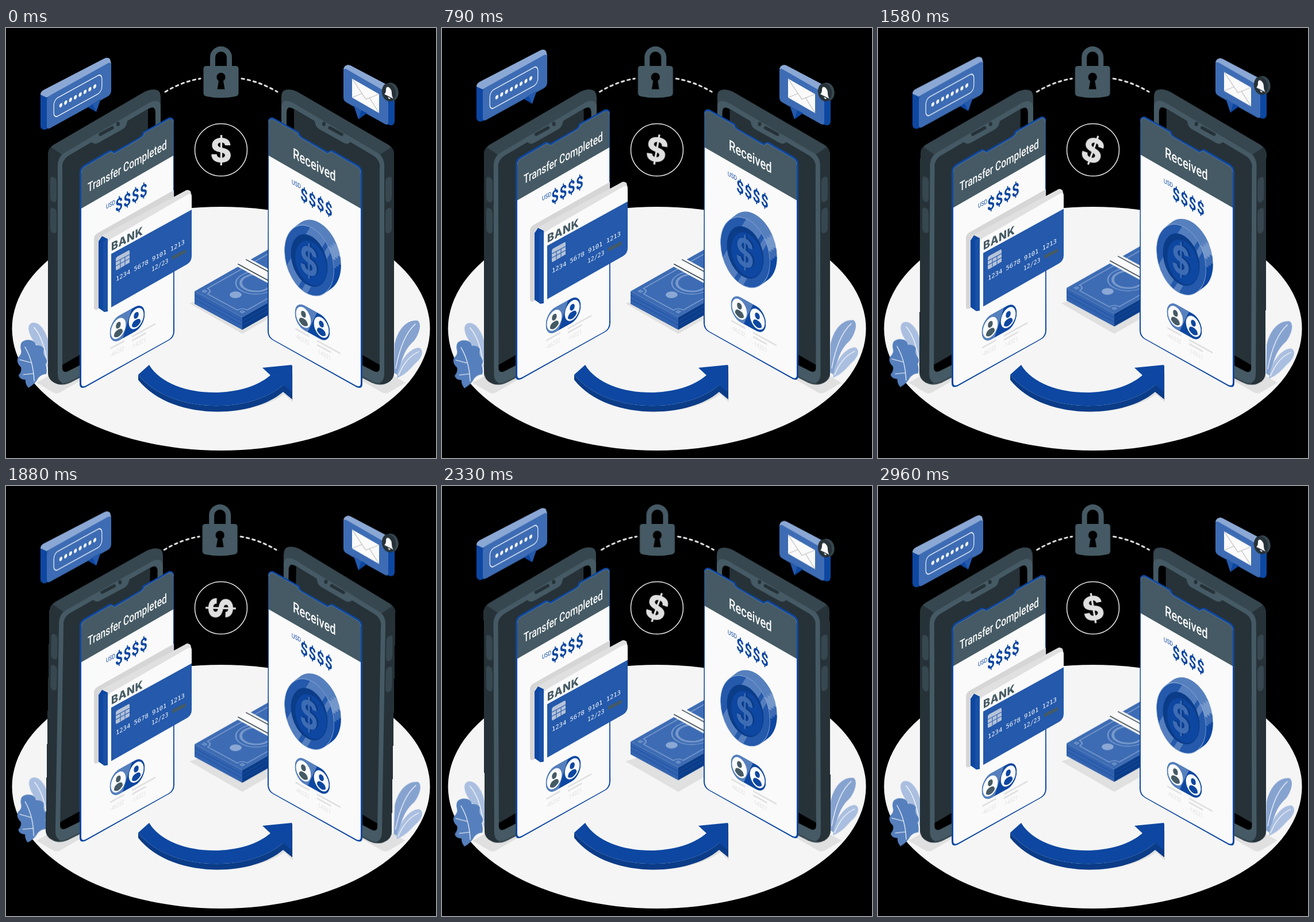
These frames come from a looping animation (748x748 px, 3 s). An HTML page:

```html
<!DOCTYPE html>
<html lang="en">
<head>
<meta charset="utf-8">
<title>Mobile transfer</title>
<style>
html, body { margin: 0; width: 100%; height: 100%; overflow: hidden; background: #000; }
svg { display: block; width: 100vw; height: 100vh; font-family: Roboto, Inter, sans-serif; }
.float { animation: float 1.5s linear infinite; }
.late { animation: late 3s linear infinite; }
.slow { animation: slow 3s linear infinite; }
.shake { animation: shake 1.5s linear infinite; }
.spin { animation: spin 1.5s linear infinite; transform-origin: 374px 212px; }
.wind { animation: wind 1.5s linear infinite; }
@keyframes float { 50% { transform: translateY(-15px); } }
@keyframes late {
  0%, 33.333%, 83.333% { transform: translateY(0); }
  58.333% { transform: translateY(-15px); }
  100% { transform: translateY(-10px); }
}
@keyframes slow {
  0%, 33.333% { transform: translateY(0); }
  83.333% { transform: translateY(-15px); }
  100% { transform: translateY(-10px); }
}
@keyframes shake {
  10%, 90% { transform: translateX(-1.5px); }
  20%, 80% { transform: translateX(3px); }
  30%, 50%, 70% { transform: translateX(-6px); }
  40%, 60% { transform: translateX(6px); }
}
@keyframes spin { to { transform: rotate(360deg); } }
@keyframes wind {
  25% { transform: rotate(1deg); }
  75% { transform: rotate(-1deg); }
}
.navy { fill: #0d47a1; }
.deep { fill: #0b3c88; }
.card { fill: #2459ab; }
.mid { fill: #3d6cb4; }
.soft { fill: #5680bd; }
.pale { fill: #8ba8d5; }
.mist { fill: #aabfe0; }
.slate { fill: #455a64; }
.steel { fill: #37474f; }
.ink { fill: #263238; }
.white { fill: #fafafa; }
.grey { fill: #e0e0e0; }
.line { fill: none; stroke: #fafafa; stroke-width: 1.5; stroke-linecap: round; stroke-linejoin: round; }
.vein { fill: none; stroke: #fafafa; stroke-width: 1.2; stroke-linecap: round; }
.title { font-weight: 500; fill: #fafafa; }
.sum { font-weight: 700; font-size: 30px; letter-spacing: 1.6px; fill: #0d47a1; }
.usd { font-size: 11px; fill: #0d47a1; }
.digits { font: 10.5px "DejaVu Sans Mono", monospace; fill: #fafafa; }
</style>
</head>
<body>
<svg viewBox="0 0 748 748">
<defs>
  <g id="phone">
    <path class="steel" d="M73 221Q73 209 83 203L241 111Q256 104 265 109Q269 112 269 122V522Q269 536 258 542L112 617Q96 624 84 617Q73 611 73 599Z"/>
    <path class="ink" d="M73 221Q73 212 78 207L97 220L97 619Q90 620 84 617Q73 611 73 599Z"/>
    <path class="slate" d="M90 240Q90 224 102 217L249 130Q267 121 269 136V522Q269 532 260 537L112 614Q91 624 90 602Z"/>
    <path d="M98 243Q98 230 108 223L247 141Q260 133 260 148V520L110 596Q99 602 98 592Z"/>
    <path class="ink" d="M98 243Q98 230 108 223L247 141V500L98 586Z"/>
    <path class="slate" d="M147 197L151 200Q155 203 162 199L203 176Q209 172 210 166L212 159Z"/>
    <path d="M164 185L185 173.500" stroke="#263238" stroke-width="5.500" stroke-linecap="round"/>
    <ellipse class="ink" cx="195" cy="167" rx="3" ry="3.800"/>
    <g class="steel">
      <path d="M77 264q0-6 5-5q6 2 6 10v28q0 7-5 6q-6-2-6-9z"/>
      <path d="M77 318q0-6 5-5q6 2 6 10v28q0 7-5 6q-6-2-6-9z"/>
    </g>
  </g>
  <g id="screen">
    <path class="navy" d="M128 252Q128 243 136 238L181 212L188 215L232 190Q237 187 238 181L281 157Q288 153 292 160L293 527Q293 538 284 543L138 625Q128 629 128 619Z"/>
    <path class="white" d="M131 253Q131 245 138 241L181 216Q184 214 188 219L234 192Q240 188 241 183L282 160Q291 156 291 166V527Q291 537 283 542L139 622Q131 626 131 618Z"/>
    <path class="slate" d="M131 314V253Q131 245 138 241L181 216Q184 214 188 219L234 192Q240 188 241 183L282 160Q291 156 291 166V222Z"/>
  </g>
  <clipPath id="pill"><rect x="-40" y="-21.500" width="80" height="43" rx="21.500"/></clipPath>
  <g id="head"><circle cy="-5.500" r="5.500"/><path d="M-10 10Q-10 2 0 2T10 10Q5 14.500 0 14.500T-10 10Z"/></g>
  <g id="users">
    <g clip-path="url(#pill)">
      <path class="navy" d="M-40-22H40V22H-40Z"/>
      <path class="soft" d="M-40-22H11L-11 22H-40Z"/>
    </g>
    <circle class="white" cx="-20.500" r="17"/>
    <circle class="white" cx="20.500" r="17"/>
    <use href="#head" class="slate" x="-20.500"/>
    <use href="#head" class="navy" x="20.500"/>
    <g class="grey">
      <path d="M-39 26h32v3h-32zM10.500 26h54v3h-54zM10.500 33h32v3h-32z"/>
      <text x="-39.500" y="43" font-size="10.500">-46232</text>
      <text x="10" y="49" font-size="10.500">-14321</text>
    </g>
  </g>
  <linearGradient id="edge" gradientUnits="userSpaceOnUse" x1="0" y1="-57" x2="0" y2="57">
    <stop offset=".22" stop-color="#5680bd"/><stop offset=".22" stop-color="#7598cb"/>
    <stop offset=".38" stop-color="#7598cb"/><stop offset=".38" stop-color="#3d6cb4"/>
    <stop offset=".5" stop-color="#3d6cb4"/><stop offset=".5" stop-color="#0d47a1"/>
  </linearGradient>
  <clipPath id="face"><circle r="56"/></clipPath>
  <circle id="rim" r="57" fill="url(#edge)"/>
</defs>

<ellipse cx="374" cy="523" rx="363.500" ry="212" fill="#f5f5f5"/>
<g class="grey">
  <path d="M53 617L76 604L132 600V612L94 634Q88 637 82 634Z"/>
  <path d="M695 617L672 604L616 600V612L654 634Q660 637 666 634Z"/>
  <path d="M319 479L411 532L470 498L440 440Z"/>
  <path d="M230 608L236 618C287 680 425 680 484 637L499 651V600L482 621C425 672 285 672 230 603Z"/>
</g>

<g class="wind" style="transform-origin:372px 567px">
  <path class="mist" d="M40 528C36 513 48 508 59 517C69 527 75 542 75 562V598L66 572C60 555 45 547 40 528Z"/>
  <path class="vein" d="M49 521C61 535 68 555 72 585"/>
  <path class="soft" d="M27 547Q33 541 43 543Q51 545 52 552Q62 551 66 558Q64 566 67 571Q74 579 69 585Q72 594 70 602Q62 602 56 609Q52 618 39 626Q33 619 34 612Q23 611 22 604Q28 597 26 590Q17 582 21 573Q28 567 26 560Q24 552 27 547Z"/>
  <path class="vein" d="M33 555C42 570 48 590 49 614M24 577L43 582M30 603L48 601"/>
  <path fill="#86a3d0" d="M676 550C682 523 698 507 716 509C724 514 719 532 710 544C694 558 688 575 682 604L675 600Z"/>
  <path class="mist" d="M680 609C682 585 698 558 718 556C728 559 724 572 716 580C706 588 700 601 680 609Z"/>
  <path class="vein" d="M678 592C684 560 695 530 712 515M683 604C690 586 702 570 718 563"/>
</g>

<g class="wind" style="transform-origin:171px 364px"><use href="#phone"/></g>
<g class="wind" style="transform-origin:577px 364px"><use href="#phone" transform="matrix(-1 0 0 1 748 0)"/></g>

<g class="slow">
  <path fill="#3363af" d="M328 458L411 503V525L328 480Z"/>
  <path class="deep" d="M411 503L480 464V486L411 525Z"/>
  <path d="M328 465L411 510L480 471M328 472L411 517L480 478" fill="none" stroke="#174fa5"/>
  <g transform="matrix(.866 -.491 .866 .47 328 458)">
    <path class="mid" d="M0 0H170V96H0Z"/>
    <g fill="none" stroke="#7899cc" stroke-width="2">
      <path d="M8 18Q18 18 18 8H170M8 18V78Q18 78 18 88H170M8 8h4v4h-4zM8 84h4v4h-4z"/>
      <circle cx="76" cy="48" r="29"/><circle cx="76" cy="48" r="22" stroke-width="4"/>
    </g>
    <circle class="pale" cx="34" cy="48.500" r="8.500"/>
    <path class="white" d="M87-5H113V96H87Z"/>
    <path d="M92-5V96M108-5V96" stroke="#37474f" stroke-width="2"/>
  </g>
</g>

<path class="deep" d="M230 603V612C285 682 425 682 482 633L498 646V586L482 621C425 672 285 672 230 603Z"/>
<path class="navy" d="M249 586C285 645 410 648 460 604L446 591L497 586V633L482 621C425 672 285 672 230 603Z"/>

<g class="float">
  <use href="#screen"/>
  <text class="title" font-size="22" transform="matrix(.705 -.39 0 1 142 286)">Transfer Completed</text>
  <text class="usd" transform="matrix(.76 -.42 0 1 174 315)">USD</text>
  <text class="sum" transform="matrix(.76 -.42 0 1 190 321)">$$$$</text>
  <path fill="#d6d6d6" d="M153 367Q153 361 159 357L292 282V410L160 489Q153 493 153 485Z"/>
  <path class="grey" d="M161 371Q161 365 167 361L312 283Q316 280 321 284L323 292L176 372Z"/>
  <path class="white" d="M177 376Q177 370 184 366L314 291Q323 286 323 294V396L177 482Z"/>
  <path class="card" d="M183 393L323 316V397Q323 406 315 411L183 486Z"/>
  <path class="navy" d="M161 371L167 362L177 367V493L171 494L161 487Z"/>
  <path class="card" d="M169 371L177 367V491L169 493Z" opacity=".55"/>
  <text font-family="Inter, sans-serif" font-weight="800" font-size="19.500" letter-spacing=".6" class="slate" transform="matrix(.93 -.49 0 1 183 388)">BANK</text>
  <path d="M193 398L213 387Q215 386 215 389V408L193 421Q191 422 191 419V401Z" fill="#b6c3d8"/>
  <path d="M191 407L215 394M191 414L215 401M199 403V417M207 398V413" fill="none" stroke="#3d6cb4" stroke-width="1.300"/>
  <g class="digits">
    <text transform="matrix(1 -.55 0 1 191 441)">1234 5678 9101 1213</text>
    <text transform="matrix(.93 -.51 0 1 253 424)">12/23</text>
  </g>
  <path class="slate" d="M289 397L313 385V391L289 403Z"/>
  <use href="#users" transform="matrix(.76 -.42 0 1 211 514)"/>
</g>

<g class="float">
  <use href="#screen" transform="matrix(-1 0 0 1 748 0)"/>
  <text class="title" font-size="25.500" transform="matrix(.72 .4 0 1 499 226)">Received</text>
  <text class="usd" transform="matrix(.76 .42 0 1 497 271)">USD</text>
  <text class="sum" transform="matrix(.76 .42 0 1 512 298)">$$$$</text>
  <g transform="matrix(.76 .3 0 1.045 539.500 395.500)"><use href="#rim"/></g>
  <g transform="matrix(.76 .3 0 1.045 535.500 398.500)"><use href="#rim"/></g>
  <g transform="matrix(.76 .3 0 1.045 531.500 401.500)"><use href="#rim"/></g>
  <g transform="matrix(.76 .3 0 1.045 527.500 404.500)">
    <circle class="card" r="56.500" stroke="#8ba8d5"/>
    <g clip-path="url(#face)" fill="#fff" opacity=".22">
      <path d="M-60 35L25-90L60-75L-35 65ZM-28 70L52-50L60-45L-20 80Z"/>
    </g>
    <circle class="deep" r="42"/>
    <circle class="navy" cx="4" cy="3" r="36"/>
    <g text-anchor="middle" font-family="Inter, sans-serif" font-weight="700" font-size="64">
      <text class="deep" x="3" y="22">$</text>
      <text class="mid" x="-1" y="24">$</text>
    </g>
  </g>
  <use href="#users" transform="matrix(.76 .42 0 1 533 512)"/>
</g>

<g class="float">
  <path class="navy" d="M60 116L72 117V175Q66 179 62 175Q60 173 60 170Z"/>
  <path class="pale" d="M60 116Q60 111 65 108L171 53Q177 50 181 54L183 62L71 121Z"/>
  <path class="mid" d="M71 126Q71 120 77 117L176 62Q183 58 183 65V109Q183 115 177 119L77 174Q71 177 71 171Z"/>
  <path class="navy" d="M143 138L152 131L157 146Z"/>
  <path class="card" d="M150 132L165 123L157 146Z"/>
  <g transform="matrix(.76 -.42 0 1 125 118)">
    <rect class="line" x="-55" y="-16" width="110" height="32" rx="9"/>
    <path d="M-39 0H40" stroke="#fafafa" stroke-width="7" stroke-linecap="round" stroke-dasharray="0 11.100"/>
  </g>
</g>

<g class="late">
  <path class="navy" d="M663 114L676 109V162Q676 167 672 169Q668 170 663 167Z"/>
  <path class="pale" d="M587 72Q588 65 595 64L599 65L671 103Q676 107 676 113L665 119Z"/>
  <path class="mid" d="M587 75Q587 69 593 72L659 110Q665 114 665 120V164Q665 170 659 167L593 130Q587 127 587 121Z"/>
  <path class="card" d="M605 135L620 144L613 159Z"/>
  <path class="navy" d="M618 143L628 148L613 159Z"/>
  <path class="white" d="M602 88L649 115V148L602 121Z"/>
  <path d="M602 88L626 124L649 115M602 121L619 114M649 148L632 121" fill="none" stroke="#c2c2c2" stroke-width="1.300"/>
  <ellipse class="steel" cx="670" cy="111" rx="12.500" ry="16" transform="rotate(-12 670 111)"/>
  <ellipse class="ink" cx="666" cy="112" rx="12" ry="16" transform="rotate(-12 666 112)"/>
  <path class="white" d="M658 115Q661 113 661 107Q661 101 666 103Q671 107 671 113Q671 119 674 123ZM664 120L669 122Q667 126 664 120Z"/>
</g>

<g class="shake">
  <path d="M277 111Q307 93 338 88M410 88Q441 93 472 111" fill="none" stroke="#e0e0e0" stroke-width="3" stroke-linecap="round" stroke-dasharray="4.500 6"/>
  <path d="M359.500 70V51A14.500 14.500 0 0 1 388.500 51V70" fill="none" stroke="#455a64" stroke-width="9"/>
  <path class="slate" d="M343.500 71Q343.500 66 349 66H399Q404.500 66 404.500 71V113Q404.500 118 399 119Q374 124 349 119Q343.500 118 343.500 113Z"/>
  <path d="M370 92L367.500 106.500H380.500L378 92A7.700 7.700 0 1 0 370 92Z"/>
</g>

<circle cx="374" cy="212" r="45.500" fill="none" stroke="#ebebeb" stroke-width="1.500"/>
<g class="spin"><text class="grey" x="374" y="232.700" text-anchor="middle" font-family="Inter, sans-serif" font-weight="800" font-size="57">$</text></g>
</svg>
</body>
</html>
```
